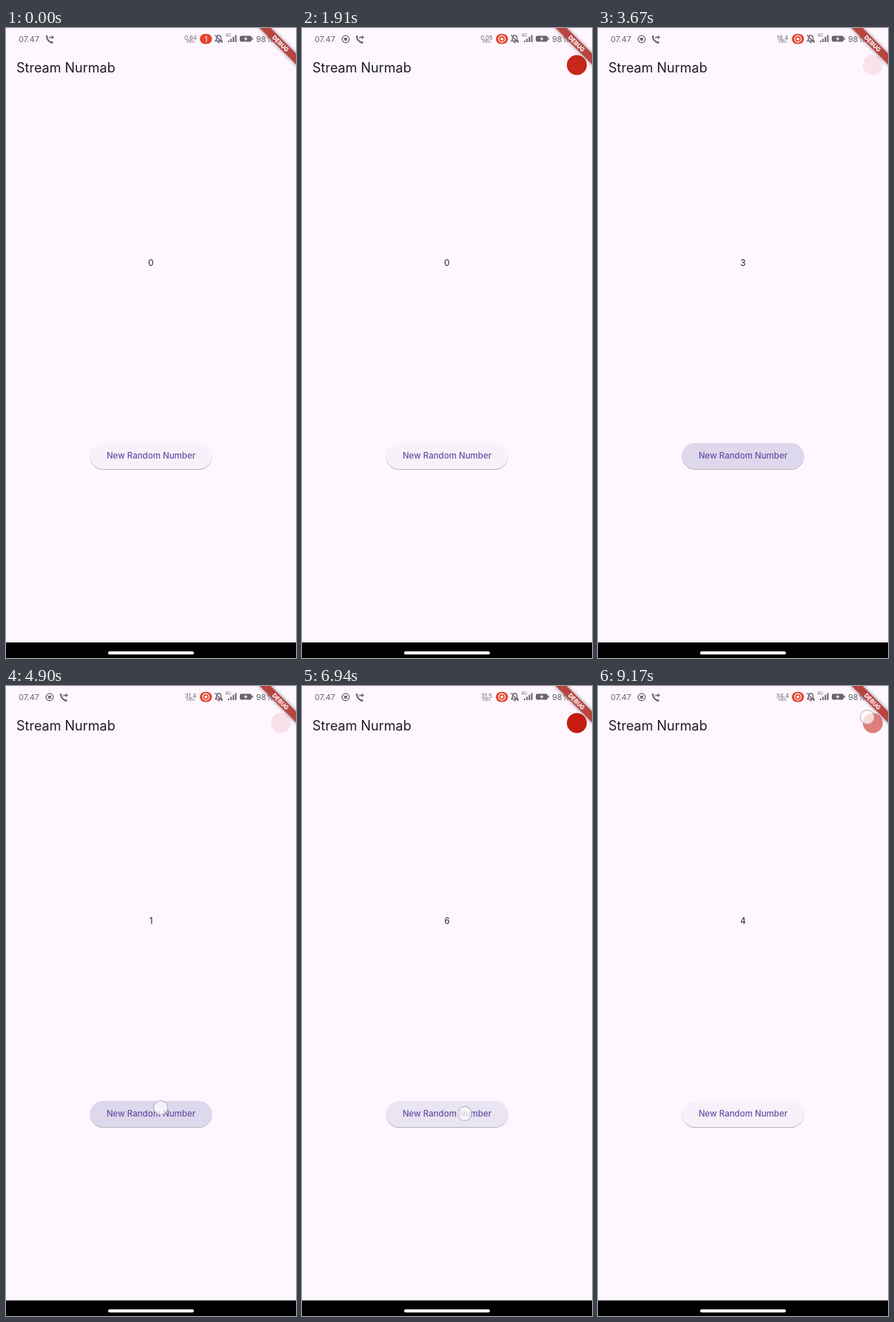
An HTML page that plays this animation: 392 by 850 pixels, repeating every 9.19 s.

```html
<!DOCTYPE html>
<html lang="en">
<head>
<meta charset="utf-8">
<title>Random number stream</title>
<style>
  html, body { margin: 0; width: 100%; height: 100%; overflow: hidden; background: #fef7ff; }
  svg { display: block; width: 392px; height: 850px; font-family: Inter, sans-serif; }
  #button { filter: drop-shadow(0 1px .7px rgba(0, 0, 0, .28)); }
  #band { filter: drop-shadow(0 0 2.5px rgba(0, 0, 0, .45)); }
  .line { fill: none; stroke: #68656a; stroke-width: 1.3; }
</style>
</head>
<body>
<svg viewBox="0 0 392 850">
  <rect width="392" height="850" fill="#fef7ff"/>

  <g fill="#68656a" font-size="11">
    <text x="17" y="18.800">07.47</text>
    <g id="recIcon">
      <circle class="line" cx="59" cy="15" r="4.800"/>
      <circle cx="59" cy="15" r="2.200"/>
    </g>
    <g id="call">
      <path class="line" style="stroke-width:2" d="M-4-3.500C-4 1 0 4.500 4 4.500"/>
      <path class="line" style="stroke-width:2.400" d="M-5-3.500h2.500M1.500 4.500h3"/>
      <path class="line" d="M-.5-1L.5-2.500H5M3-4.500l2 2-2 2"/>
    </g>
    <g text-anchor="middle">
      <text id="speed" x="249.500" y="15.500" font-size="8"></text>
      <text x="249.500" y="20.300" font-size="4.800">KB/s</text>
    </g>
    <path class="line" d="M283 17.500h9l-1.500-2v-2.500a3 3 0 0 0-6 0v2.500zM286 19.500h3M282.500 9.500l10 10.500"/>
    <text x="296.500" y="12" font-size="5.500">4G</text>
    <path d="M300 19v-2h2v2zM303.200 19v-4.500h2v4.500zM306.400 19v-7h2v7zM309.600 19v-9.500h2v9.500z"/>
    <rect x="316" y="10.500" width="16" height="8" rx="2"/>
    <rect x="332.500" y="13" width="1.500" height="3"/>
    <path d="M325 11l-3.500 4h2.300l-.8 3 3.500-4h-2.300z" fill="#fef7ff"/>
    <text x="338" y="18.800">98%</text>
  </g>

  <rect x="262" y="8" width="16.500" height="13.500" rx="6.700" fill="#e6432c"/>
  <text id="badge" x="270.200" y="18.500" font-size="10" text-anchor="middle" fill="#fff">1</text>
  <g id="recBadge">
    <circle cx="270.200" cy="14.700" r="4.400" fill="none" stroke="#fff" stroke-width="1.200"/>
    <circle cx="270.200" cy="14.700" r="2" fill="#fff"/>
  </g>

  <text x="14" y="60" font-size="18" fill="#1d1b20">Stream Nurmab</text>
  <text id="number" x="196" y="321" font-size="11.500" text-anchor="middle" fill="#1d1b20"></text>

  <rect id="button" x="113.500" y="560" width="165" height="35" rx="17.500"/>
  <text x="196" y="581" font-size="11.500" font-weight="500"
        text-anchor="middle" fill="#6750a4">New Random Number</text>

  <circle id="dot" cx="371.500" cy="50" r="13.500" fill="#c41c10"/>
  <g transform="translate(392 0) rotate(45)">
    <rect id="band" x="-40" y="24.300" width="80" height="10.400" fill="#b8433f"/>
    <text y="32.500" font-size="8" font-weight="800" text-anchor="middle" fill="#fff">DEBUG</text>
  </g>

  <circle id="touch" r="9.500" fill="#fff" fill-opacity=".72" stroke="#999" stroke-opacity=".5" stroke-width="1.400"/>

  <rect y="829" width="392" height="21"/>
  <rect x="138" y="841" width="116" height="4.300" rx="2.100" fill="#fafafa"/>
</svg>
<script>
const LOOP = 9190, REC_START = 400, STOP_TOUCH = 9080;
const RAMP = 120, HOLD = 140, LINGER = 70, FADE = 300;
const PULSE = 1240, PULSE_PEAK = 6940;
const IDLE = [247, 242, 250], PRESSED = [222, 216, 236];

// Press time, resulting digit, finger position
const taps = [
  [2400, 6, 212, 575], [3480, 3, 214, 574], [4130, 1, 211, 572], [4780, 5, 209, 569],
  [5470, 8, 213, 573], [6170, 6, 217, 576], [6880, 2, 220, 577], [7560, 7, 219, 576],
  [8250, 4, 219, 576]
];
const speeds = [[0, '0,64'], [400, '0,85'], [1900, '0,05'], [3100, '18,4'],
                [4300, '31,4'], [6000, '31,5'], [8000, '34,4']];

const $ = id => document.getElementById(id);
const clamp = v => Math.max(0, Math.min(1, v));
const mix = (a, b, k) => a.map((v, i) => Math.round(v + (b[i] - v) * k));
const show = (id, on) => $(id).setAttribute('visibility', on ? 'visible' : 'hidden');

function draw(t) {
  const recording = t >= REC_START;
  show('recIcon', recording);
  show('recBadge', recording);
  show('badge', !recording);
  show('dot', recording);
  $('call').setAttribute('transform', `translate(${recording ? 78 : 59} 15)`);
  $('speed').textContent = speeds.findLast(s => t >= s[0])[1];

  const wave = (1 + Math.cos((t - PULSE_PEAK) / PULSE * 2 * Math.PI)) / 2;
  $('dot').setAttribute('opacity', wave ** 1.4);

  let digit = 0, press = 0, finger = null;
  for (const [down, value, x, y] of taps) {
    const age = t - down;
    if (age < 0) break;
    if (age < HOLD) finger = [x, y];
    else digit = value;
    press = clamp(age / RAMP) * clamp(1 - (age - HOLD - LINGER) / FADE);
  }
  if (t >= STOP_TOUCH) finger = [364, 42];

  $('number').textContent = digit;
  $('button').setAttribute('fill', `rgb(${mix(IDLE, PRESSED, press)})`);
  show('touch', finger);
  if (finger) $('touch').setAttribute('transform', `translate(${finger})`);
}

const start = performance.now();
function tick() {
  draw((performance.now() - start) % LOOP);
  requestAnimationFrame(tick);
}
tick();
</script>
</body>
</html>
```
